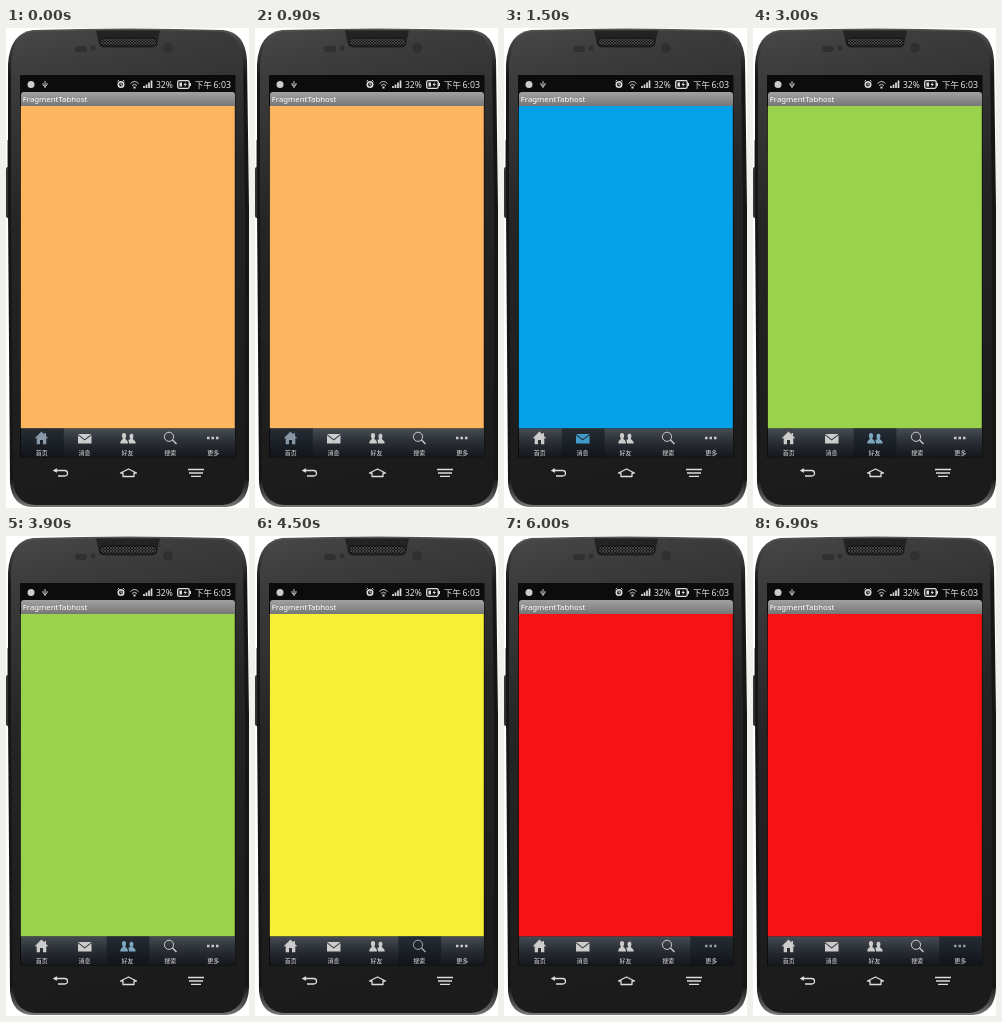
An HTML page for the animation above (7.5 s loop, 243 by 480 pixels).

```html
<!DOCTYPE html>
<html lang="zh">
<head>
<meta charset="utf-8">
<style>
html, body { margin: 0; width: 100%; height: 100%; overflow: hidden; background: #fff; }
svg { display: block; }
text { font-family: "Noto Sans", "Noto Sans CJK SC", "Noto Sans CJK", sans-serif; fill: #e4e4e4; }
.label { font-size: 6px; font-weight: 500; text-anchor: middle; }
.line { fill: none; stroke: #ddd; }
</style>
</head>
<body>
<svg width="243" height="480" viewBox="0 0 243 480">
  <defs>
    <linearGradient id="body" x2=".12" y2="1">
      <stop stop-color="#484848"/><stop offset=".1" stop-color="#3c3c3c"/>
      <stop offset=".4" stop-color="#252525"/><stop offset="1" stop-color="#1b1b1b"/>
    </linearGradient>
    <linearGradient id="rim" x2="0" y2="1">
      <stop stop-color="#555"/><stop offset=".1" stop-color="#161616"/>
      <stop offset=".94" stop-color="#161616"/><stop offset="1" stop-color="#777"/>
    </linearGradient>
    <linearGradient id="title" x2="0" y2="1">
      <stop stop-color="#a2a2a2"/><stop offset="1" stop-color="#767676"/>
    </linearGradient>
    <linearGradient id="bar" x2="0" y2="1">
      <stop stop-color="#474b53"/><stop offset=".45" stop-color="#2b2f36"/><stop offset="1" stop-color="#14171c"/>
    </linearGradient>
    <linearGradient id="active" x2="0" y2="1">
      <stop stop-color="#262c34"/><stop offset="1" stop-color="#11151a"/>
    </linearGradient>
    <pattern id="mesh" width="3" height="3" patternUnits="userSpaceOnUse">
      <rect width="3" height="3" fill="#181818"/>
      <path d="M0 0L3 3M3 0L0 3" stroke="#5c5c5c" stroke-width=".6"/>
    </pattern>
  </defs>

  <!-- Phone -->
  <path d="M3 112H1.500V139Q0 139 0 142V187Q0 190 1.500 190H4Z" fill="#333"/>
  <path d="M27 2Q123 -1 217 2Q239 4 241 32L243 180V452Q242 477 220 479H26Q6 478 4 455L2 180V36Q4 5 27 2Z" fill="url(#rim)"/>
  <path d="M29 3.500Q123 1 214 3.500Q235 5 237 34L239 180V450Q238 475 216 477H30Q9 476 7 453L5 180V37Q7 6 29 3.500Z" fill="url(#body)"/>
  <path d="M90 2.500H154L151 16Q150 19.500 146 19.500H98Q94 19.500 93 16Z" fill="#232323"/>
  <rect x="94" y="10" width="57" height="8" rx="4" fill="url(#mesh)" stroke="#0c0c0c" stroke-width=".8"/>
  <g fill="#303030">
    <rect x="69" y="18" width="12" height="6" rx="3"/>
    <circle cx="87" cy="20" r="2.500"/>
    <circle cx="162" cy="20" r="5"/>
  </g>

  <!-- Screen -->
  <rect x="14" y="47" width="215.500" height="382.500" fill="#0c0c0c"/>
  <circle cx="25" cy="56.500" r="3.500" fill="#ccc"/>
  <g class="line" stroke-width=".9">
    <path d="M39 53V60M37 55V57L39 58.500L41 57V55"/>
    <circle cx="115" cy="56.500" r="2.700" stroke-width="1.600"/>
    <path d="M115 54.500V57H116.500M111.500 53.500L113 52M117 52L118.500 53.500"/>
    <path d="M124.500 55.500Q128.500 51.500 132.500 55.500M126 57.500Q128.500 55 131 57.500"/>
    <path d="M138 60V58M140.500 60V56.500M143 60V54.500M145.500 60V52.500" stroke-width="1.700"/>
    <rect x="171.700" y="52.700" width="11.500" height="7.600" rx="1.500" stroke-width="1.300"/>
  </g>
  <path d="M127.500 58.500H129.500V60.500H127.500ZM173.500 54.500H176V58.500H173.500ZM179.500 54L177.500 57H179L178.500 59L181 56H179.500ZM183.500 55H185V58H183.500Z" fill="#ddd"/>
  <text x="150" y="60" font-size="8.500">32%</text>
  <text x="189" y="60" font-size="8.500">下午</text>
  <text x="207.500" y="60" font-size="8.800">6:03</text>

  <path d="M15 78V67Q15 64 18 64H226Q229 64 229 67V78Z" fill="url(#title)"/>
  <text x="16.800" y="74.200" font-size="7.800" font-weight="500" style="fill:#fff">FragmentTabhost</text>
  <rect id="page" x="14.800" y="78" width="214" height="322.500"/>

  <!-- Tabs -->
  <rect x="15" y="400.500" width="214" height="28.500" fill="url(#bar)"/>
  <rect id="mark" y="400.500" width="42.800" height="28.500" fill="url(#active)"/>
  <g id="icons" fill="#ccc" color="#ccc">
    <path d="M35.500 403.500L28.700 410.200H30.700V416.200H34V412H37V416.200H40.300V410.200H42.300L40 408V405H38.500V406.500Z"/>
    <path d="M72 406H85.500L78.700 411.300ZM72 407.200L78.700 412.500L85.500 407.200V415.500H72Z"/>
    <path d="M118 405C120.300 405 120.800 408 119.300 410.500C119.800 412 122 412 122 415.500H114.300C114.300 412 116.600 412 116.900 410.500C115.300 408 115.800 405 118 405ZM125.500 405.800C127.700 405.800 128 408.500 126.700 410.800C127.200 412.200 129.700 412.200 129.700 415.500H123C123 413 122.300 412.300 122 411.800C123.300 411.800 124 411.500 124.300 410.800C123 408.500 123.300 405.800 125.500 405.800Z"/>
    <path d="M166.500 412L170.500 416" stroke="currentColor" stroke-width="1.500"/>
    <path d="M201 408.800H203.500V411.200H201ZM205.500 408.800H208V411.200H205.500ZM210 408.800H212.500V411.200H210Z"/>
  </g>
  <circle id="lens" cx="163" cy="408.800" r="4.600" fill="none" stroke-width="1"/>
  <g class="label">
    <text x="35.700" y="426.800">首页</text>
    <text x="78.600" y="426.800">消息</text>
    <text x="121.500" y="426.800">好友</text>
    <text x="164.300" y="426.800">搜索</text>
    <text x="207.200" y="426.800">更多</text>
  </g>

  <!-- Hardware keys -->
  <g class="line" stroke-width="1.300">
    <path d="M51 440.800L48 442.500L51 444.200M48 442.500H58.500Q61.500 442.500 61.500 445.300T58.500 448H52"/>
    <path d="M122.500 441L114.500 445H117V448.500H128V445H130.500Z" stroke-linejoin="round"/>
    <path d="M182 441.500H198M183 445H197M185 448.300H195"/>
  </g>
</svg>
<script>
const pages = ["#fdb55f", "#03a2e8", "#9bd24b", "#f5f035", "#f71314"];
const lit = ["#8797a5", "#419ccb", "#7ca6be", "#a3acb5", "#929ba4"];
const get = id => document.getElementById(id);
const icons = [...get("icons").children];

function draw(now) {
  const tab = Math.floor(now % 7500 / 1500);
  get("page").setAttribute("fill", pages[tab]);
  get("mark").setAttribute("x", 15 + tab * 42.8);
  icons.forEach((icon, i) => {
    const color = i === tab ? lit[i] : "#ccc";
    icon.setAttribute("fill", color);
    icon.setAttribute("color", color);
  });
  get("lens").setAttribute("stroke", tab === 3 ? lit[3] : "#ccc");
  requestAnimationFrame(() => draw(performance.now()));
}
draw(performance.now());
</script>
</body>
</html>
```
